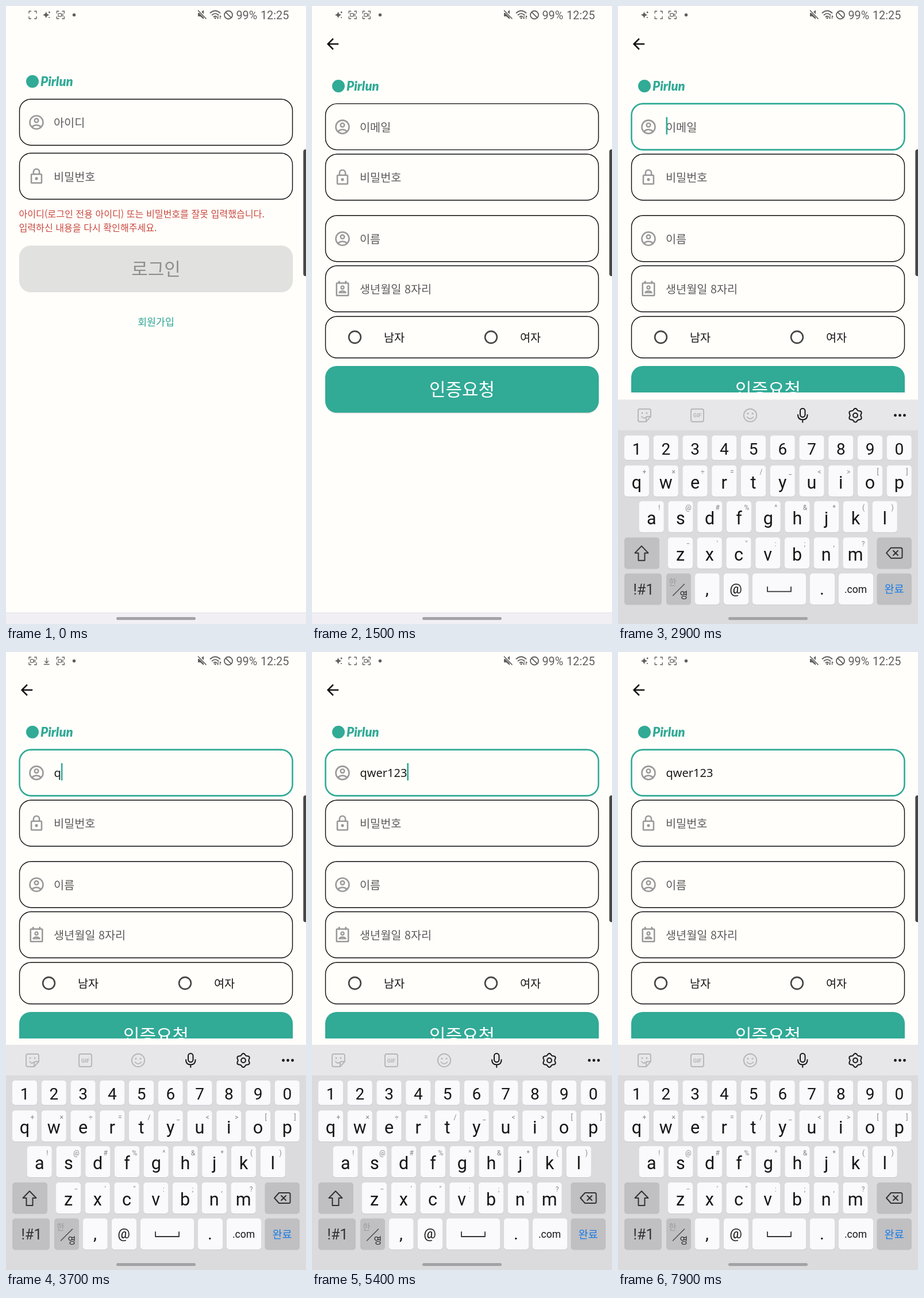
An HTML page that plays this animation: 522x1073 px, repeating every 8000 ms.

```html
<!DOCTYPE html>
<html lang="ko">
<head>
<meta charset="utf-8">
<style>
  html, body { margin: 0; width: 100%; height: 100%; overflow: hidden; background: #fffefa; }
  svg { display: block; width: 522px; height: 1073px; }
  text { font-family: "Noto Sans CJK KR", "Noto Sans CJK JP", "Noto Sans CJK", sans-serif; white-space: pre; }
  .latin { font-family: "Noto Sans", sans-serif; }
  .ui { font-family: Roboto, sans-serif; }
  .line { fill: none; stroke-linecap: round; stroke-linejoin: round; }
</style>
</head>
<body>
<svg id="stage" viewBox="0 0 522 1073"></svg>
<script>
const LOOP = 8000, APP_H = 1053, PAPER = '#fffefa', TEAL = '#31aa96', GREY = '#999', STATUS = '#5f5f5f';

// Basic shapes
const rect = (x, y, w, h, r, fill, extra = '') =>
  `<rect x="${x}" y="${y}" width="${w}" height="${h}" rx="${r}" fill="${fill}" ${extra}/>`;
const circle = (x, y, r, fill, extra = '') => `<circle cx="${x}" cy="${y}" r="${r}" fill="${fill}" ${extra}/>`;
const ring = (x, y, r, color, width) => circle(x, y, r, 'none', `stroke="${color}" stroke-width="${width}"`);
const line = (d, color, width, extra = '') =>
  `<path class="line" d="${d}" stroke="${color}" stroke-width="${width}" ${extra}/>`;
const text = (str, x, y, size, fill, extra = '') =>
  `<text x="${x}" y="${y}" font-size="${size}" fill="${fill}" ${extra}>${str}</text>`;
const MID = 'text-anchor="middle"';
const group = (id, body, extra = '') => `<g id="${id}" ${extra}>${body}</g>`;
const at = (x, y, scale, body) => `<g transform="translate(${x} ${y}) scale(${scale}) translate(-12 -12)">${body}</g>`;

// Form icons on a 24-unit grid
const icons = {
  person: ring(12, 12, 9, GREY, 2) + ring(12, 9.5, 2.6, GREY, 1.9) + line('M6 18.2c3-3.4 9-3.4 12 0', GREY, 2),
  lock: rect(5, 9, 14, 12, 1, 'none', `stroke="${GREY}" stroke-width="2"`) +
    line('M8 9V6a4 4 0 0 1 8 0V9', GREY, 2) + circle(12, 15, 2, GREY),
  card: rect(4, 4, 16, 17, 1, 'none', `stroke="${GREY}" stroke-width="2"`) + line('M7.5 2V4M16.5 2V4', GREY, 2.4) +
    ring(12, 10, 2, GREY, 1.8) + line('M7.5 17c1.5-3 7.500-3 9 0z', GREY, 1.8)
};

// Screens
const outline = (y, h, id = '') =>
  rect(23.500, y, 475, h, 20, 'none', `${id && `id="${id}"`} stroke="#0c0c0c" stroke-width="1.4"`);
const field = (y, icon, label, id = '') => outline(y, 80, id) + at(53, y + 40.3, 1.28, icons[icon]) +
  text(label, 83, y + 48, 19.7, '#5b5b5b', id && `id="${id}Hint"`);
const logo = y => circle(46, y, 11, TEAL) +
  text('Pirlun', 60, y + 8, 22, TEAL, 'style="font-family:Lato,sans-serif" font-weight="900" font-style="italic"');
const button = (y, label, fill, color) => rect(23, y, 476, 81, 20, fill) + text(label, 261, y + 52, 31, color, MID);
const gender = (x, label) => ring(x, 575, 10.4, '#454545', 2.6) + text(label, x + 50.500, 582.5, 19.7, '#161616');

const login = rect(0, 0, 522, APP_H, 0, PAPER) + logo(131) +
  field(161.7, 'person', '아이디') + field(255.5, 'lock', '비밀번호') +
  text('아이디(로그인 전용 아이디) 또는 비밀번호를 잘못 입력했습니다.', 22.5, 367, 16.1, '#c9473f') +
  text('입력하신 내용을 다시 확인해주세요.', 22.5, 391, 16.1, '#c9473f') +
  button(416, '로그인', '#e1e1df', '#8e8e8e') +
  text('회원가입', 261, 554.5, 17.3, '#2ba693', MID + ' font-weight="500"');

const signup = rect(0, 0, 522, APP_H, 0, PAPER) + logo(139) +
  at(36, 66, 1.27, '<path d="M20 11H7.83l5.59-5.59L12 4l-8 8 8 8 1.41-1.41L7.83 13H20z" fill="#111"/>') +
  field(169.6, 'person', '이메일', 'email') + field(257.2, 'lock', '비밀번호') +
  field(363.7, 'person', '이름') + field(451, 'card', '생년월일 8자리') +
  outline(539, 72) + gender(74.5, '남자') + gender(311.5, '여자') +
  rect(23.500, 627, 475, 80.5, 20, '#000', 'opacity=".16"') + button(625, '인증요청', TEAL, '#fff') +
  text('', 83.5, 217, 20, '#1b1b1b', 'id="typed" class="latin"') +
  rect(0, 193, 2.6, 30, 0, TEAL, 'id="caret"');

// Keyboard
const KEY = '#faf9fb', DARK_KEY = '#c0bfc2', INK = '#161616', PALE = '#b6b5b8', PITCH = 50.75;
const key = (x, y, w, h, fill = KEY) => rect(x, y + 1, w, h, 5, '#c9c8cb') + rect(x, y, w, h, 5, fill);
const label = (str, x, y, size, fill = INK) => text(str, x, y, size, fill, MID + ' class="ui"');
const keyRow = (chars, alts, x0, y) => [...chars].map((c, i) => {
  const x = x0 + i * PITCH, alt = alts.split(' ')[i];
  return key(x, y, 43, 54) + label(c, x + 21.5, y + 40, 30.5) + label(alt, x + 35, y + 15.5, 12, '#858488');
}).join('');

const gear = 'M' + Array.from({ length: 73 }, (_, i) => {
  const a = i * Math.PI / 36, r = 10.6 + 1.3 * Math.cos(6 * a);
  return `${(413 + r * Math.sin(a)).toFixed(1)} ${(709 - r * Math.cos(a)).toFixed(1)}`;
}).join('L');

const toolbar = rect(0, 682, 522, 53, 0, '#e7e6e9') +
  line('M38 698h16q3 0 3 3v10l-8 9H38q-3 0-3-3v-16q0-3 3-3zM57 711h-5q-3 0-3 3v6M41 711q4 5 8 1', PALE, 1.9) +
  circle(42, 705, 1.5, PALE) + circle(50, 705, 1.5, PALE) +
  rect(127, 698, 22, 22, 3, 'none', `stroke="${PALE}" stroke-width="1.9"`) +
  text('GIF', 138, 712.5, 9.5, PALE, MID + ' class="ui" font-weight="700"') +
  ring(230, 709, 11.2, PALE, 1.9) + circle(226, 706, 1.6, PALE) + circle(234, 706, 1.6, PALE) +
  line('M224.500 712q5.500 6 11 0', PALE, 1.8) +
  rect(317, 697, 8.5, 15, 4.2, 'none', `stroke="${INK}" stroke-width="2"`) +
  line('M313 708q0 8.500 8.300 8.500t8.300-8.500M321.300 717v4', INK, 2) +
  line(gear, INK, 2) + ring(413, 709, 3.9, INK, 2) +
  [482.5, 490.5, 498.5].map(x => circle(x, 709, 2.4, INK)).join('');

const keyboard = rect(0, 682, 522, 460, 0, '#dbdadd') + toolbar +
  [...'1234567890'].map((c, i) => key(11 + i * PITCH, 744, 43, 42.500) + label(c, 32.5 + i * PITCH, 777, 28)).join('') +
  keyRow('qwertyuiop', '+ × ÷ = / _ &lt; &gt; [ ]', 11, 796) +
  keyRow('asdfghjkl', '! @ # % ^ &amp; * ( )', 36.7, 858) +
  keyRow('zxcvbnm', '− \' " : ; , ?', 87, 921) +
  key(11, 921, 61, 54, DARK_KEY) + line('M41 936l11.500 12h-6v13h-11v-13h-6z', '#333', 2) +
  key(450.5, 921, 60.5, 54, DARK_KEY) +
  line('M475 939h17q2.500 0 2.500 2.500v13q0 2.500-2.500 2.500h-17l-8-9zM479 944l8 8M487 944l-8 8', '#333', 2) +
  key(11, 983.5, 65, 54, DARK_KEY) + label('!#1', 44.5, 1020, 25, '#333') +
  key(84, 983.5, 43, 54, DARK_KEY) + text('한', 95, 1004, 14.5, '#9b9a9e', MID) +
  text('영', 114.5, 1026.5, 15, '#222', MID) + line('M95.500 1022l20-20', '#444', 1.3) +
  key(134, 983.5, 42.5, 54) + label(',', 155, 1020, 30) +
  key(184, 983.5, 43, 54) + label('@', 205, 1018, 24) +
  key(234, 983.5, 93, 54) + line('M260 1007v8h41v-8', '#333', 1.8) +
  key(334, 983.5, 43, 54) + label('.', 355, 1020, 30) +
  key(384, 983.5, 60, 54) + label('.com', 413.5, 1017, 17.5) +
  key(450.5, 983.5, 60.5, 54, DARK_KEY) + text('완료', 480.5, 1017.5, 18.5, '#157ce6', MID);

// System overlay
const corners = 'M-6.500-3v-3.500h3.500M3-6.500h3.500v3.500M6.500 3v3.500h-3.500M-3 6.500h-3.500v-3.500';
const frame = line(corners, STATUS, 1.3);
const camera = frame + rect(-4, -2.7, 5.5, 5.4, 1, 'none', `stroke="${STATUS}" stroke-width="1.2"`) +
  line('M1.500 0l2.800-2v4z', STATUS, 1);
const sparkle = `<path d="M-1-6q.8 5.200 6 6q-5.200 .8-6 6q-.8-5.200-6-6q5.200-.8 6-6z" fill="${STATUS}"/>` +
  circle(4.7, -4.5, 1.4, STATUS) + circle(4.5, 4.5, 1.1, STATUS);
const download = line('M0-5v8M-3 .5l3 3 3-3M-4.500 6h9', STATUS, 1.3);
const slot = (i, body) => `<g transform="translate(${46.5 + 24.2 * i} 15.5)">${body}</g>`;

const system = group('notices', '') + slot(2, camera) + circle(118.5, 15.5, 2.7, STATUS) +
  `<path d="M334 12h4l6-5v16l-6-5h-4z" fill="${STATUS}"/>` +
  line('M334.500 7.500l14 14', PAPER, 4) + line('M334.500 8l13.500 14', STATUS, 1.7) +
  line('M355.500 12q8.500-7.500 17 0M358.500 15.500q5.500-4.800 11 0M361.500 18.700q2.500-2 5 0', STATUS, 1.8) +
  circle(364, 21, 1.5, STATUS) + line('M369 17v5l-1.500-1.500M372.500 22v-5l1.500 1.500', STATUS, 1.2) +
  ring(387, 15.5, 7, STATUS, 1.8) + line('M382.300 10.800l9.400 9.400', STATUS, 1.8) +
  text('99%', 400.5, 22.7, 19.8, STATUS, 'class="ui"') + text('12:25', 443, 22.7, 19.8, STATUS, 'class="ui"') +
  rect(517.3, 249, 12, 220, 4, '#000', 'opacity=".72"') + rect(192, 1061, 138, 5, 2.5, '#a3a2a6');

document.getElementById('stage').innerHTML =
  group('login', login) + rect(0, 0, 522, APP_H, 0, '#000', 'id="scrim"') + group('signup', signup) +
  rect(0, 671, 522, 382, 0, PAPER, 'id="gap"') +
  rect(0, APP_H, 522, 20, 0, '#f1eff3') + rect(0, APP_H, 522, 1, 0, '#e1dfe2') +
  group('keyboard', keyboard) + system;

const parts = Object.fromEntries([...document.querySelectorAll('[id]')].map(el => [el.id, el]));
const set = (id, attrs) => { for (const name in attrs) parts[id].setAttribute(name, attrs[name]); };

// Motion
const progress = (t, start, duration) => Math.min(1, Math.max(0, (t - start) / duration));
const mix = (a, b, p) => a + (b - a) * p;

function bezier(x1, y1, x2, y2, x) {
  const point = (a, b, s) => 3 * s * (1 - s) ** 2 * a + 3 * s * s * (1 - s) * b + s ** 3;
  let lo = 0, hi = 1;
  for (let i = 0; i < 24; i++) {
    const s = (lo + hi) / 2;
    if (point(x1, x2, s) < x) lo = s; else hi = s;
  }
  return point(y1, y2, hi);
}

// Slow lift-off followed by a long settle
const emphasized = p => p < 1 / 6
  ? .4 * bezier(.05, 0, .1333, .06, p * 6)
  : .4 + .6 * bezier(.2083, .82, .25, 1, (p - 1 / 6) * 1.2);

const zoom = s => `translate(261 ${APP_H / 2}) scale(${s}) translate(-261 ${-APP_H / 2})`;

const FOCUS = 2560, KEYBOARD = 2700;
const strokes = [3500, 3800, 4050, 4300, 4700, 4950, 5200];
let notices = '';

function drawNotices(t) {
  const phase = t % 1000;
  const recorder = phase > 420 && phase < 880 ? camera : frame;
  const pair = t < 500 ? [recorder, sparkle]
    : t < 1500 || (t >= 3600 && t < 4900) ? [recorder, download]
    : [sparkle, recorder];
  const next = pair.map((body, i) => slot(i, body)).join('');
  if (next !== notices) parts.notices.innerHTML = notices = next;
}

function draw(t) {
  const p = progress(t, 666, 300), e = emphasized(p);
  set('login', { transform: zoom(mix(1, 1.05, e)), visibility: p < 1 ? 'visible' : 'hidden' });
  set('scrim', { opacity: p < 1 ? .6 * progress(p, .2075, .21) : 0 });
  set('signup', { transform: zoom(p < 1 ? mix(.85, 1, e) : 1), opacity: progress(p, .125, .125) });

  const focus = progress(t, FOCUS, 167);
  const color = [[12, 49], [12, 170], [12, 150]].map(([a, b]) => Math.round(mix(a, b, focus)));
  set('email', { stroke: `rgb(${color})`, 'stroke-width': mix(1.4, 2.6, focus) });

  const count = strokes.filter(s => s <= t).length;
  const typed = 'qwer123'.slice(0, count);
  if (parts.typed.textContent !== typed) parts.typed.textContent = typed;
  set('emailHint', { visibility: count ? 'hidden' : 'visible' });
  const sinceInput = t - (count ? strokes[count - 1] : FOCUS);
  const caretOn = sinceInput >= 0 && sinceInput % 1000 < 500;
  set('caret', { x: 83.5 + (count ? parts.typed.getComputedTextLength() : 0), opacity: caretOn ? 1 : 0 });

  const slide = 391 * (1 - progress(t, KEYBOARD, 240)) ** 3;
  set('keyboard', { transform: `translate(0 ${slide})`, visibility: t > KEYBOARD + 30 ? 'visible' : 'hidden' });
  set('gap', { visibility: t > KEYBOARD + 60 ? 'visible' : 'hidden' });
  drawNotices(t);
}

const started = performance.now();
function tick() {
  draw((performance.now() - started) % LOOP);
  requestAnimationFrame(tick);
}
tick();
</script>
</body>
</html>
```
